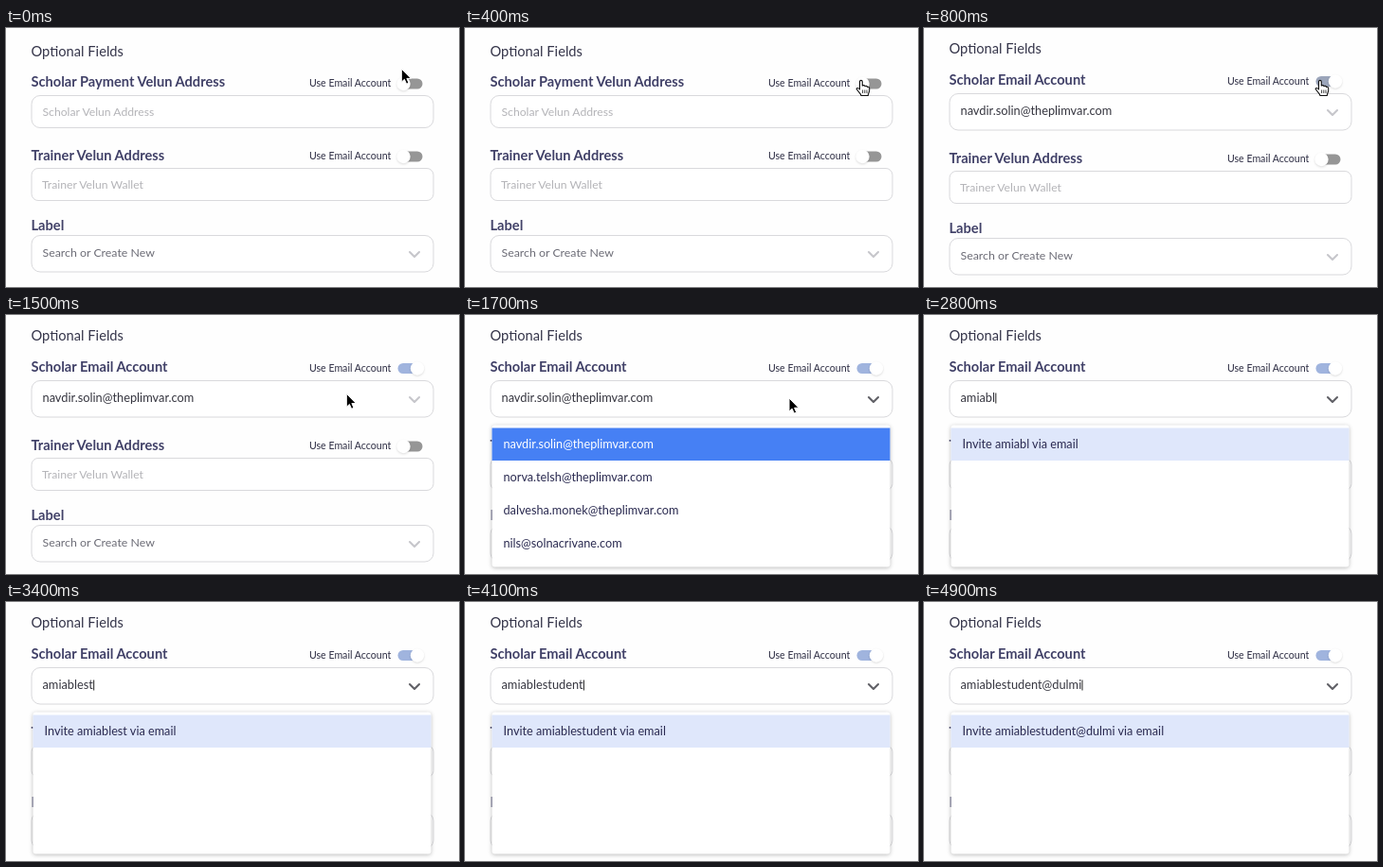
Write an HTML page that moves like this. It is 478x274 px and loops after 5000 ms.

```html
<!DOCTYPE html>
<html lang="en">
<head>
<meta charset="utf-8">
<title>Optional fields</title>
<style>
  html, body { margin: 0; width: 100%; height: 100%; overflow: hidden; background: #fefefe; }
  svg { display: block; font-family: Lato, "Open Sans", sans-serif; }
  .title { font-size: 14.7px; fill: #35354a; }
  .head { font-size: 14.65px; font-weight: 700; fill: #414168; }
  .small { font-size: 10.6px; fill: #2c2c42; }
  .hint { font-size: 12.2px; fill: #b4b4b8; }
  .pick { font-size: 12.35px; fill: #6c6c76; }
  .value { font-size: 12.8px; fill: #35353f; }
  .row { font-size: 12.7px; fill: #2a2a50; }
  .box { fill: #fff; stroke: #d9d9dc; }
  .chevron { fill: none; stroke: #c6c6cb; stroke-width: 2.1; stroke-linecap: round; stroke-linejoin: round; }
  .knob { fill: #fff; filter: drop-shadow(0 1px 1px #0002); }
  #menu > rect:first-child { fill: #fff; filter: drop-shadow(0 1px 2px #0004); }
</style>
</head>
<body>
<svg width="478" height="274" viewBox="0 0 478 274">
  <g id="upper">
    <text class="title" x="26.5" y="29.8">Optional Fields</text>
    <text class="head" id="head" x="26.5" y="62.4"></text>
    <text class="small" x="320" y="62.4">Use Email Account</text>
    <rect id="track" x="413.5" y="53.5" width="26" height="11" rx="5.5"/>
    <circle id="knob" class="knob" cy="59" r="7.2"/>
  </g>
  <rect id="field" class="box" x="27" width="424" rx="9"/>
  <text id="value" x="38.5"></text>
  <path id="caret" stroke="#222" stroke-width="1"/>
  <path id="arrowDown" class="chevron" d="M426 87l5 5 5-5"/>

  <g id="lower">
    <text class="head" x="26.5" y="139.8">Trainer Velun Address</text>
    <text class="small" x="320" y="139.4">Use Email Account</text>
    <rect x="413.5" y="130.5" width="26" height="11" rx="5.5" fill="#969696"/>
    <circle class="knob" cx="419.5" cy="136" r="7.2"/>
    <rect class="box" x="27" y="148.5" width="424" height="34" rx="7"/>
    <text class="hint" x="38" y="170">Trainer Velun Wallet</text>
    <text class="head" x="26.5" y="213.5">Label</text>
    <rect class="box" x="27" y="219.5" width="424" height="38.5" rx="9"/>
    <text class="pick" x="38.5" y="242">Search or Create New</text>
    <path class="chevron" d="M426 237l5 5 5-5"/>
  </g>

  <g id="menu">
    <rect x="28.5" y="116.5" width="420" height="150" rx="3"/>
    <rect id="mark" x="28.5" y="119.5" width="420" height="34.5"/>
    <text class="row" x="40.5" y="141"></text>
    <text class="row" x="40.5" y="176"></text>
    <text class="row" x="40.5" y="211"></text>
    <text class="row" x="40.5" y="246"></text>
  </g>

  <g id="pointer" stroke-linejoin="round">
    <path id="arrow" fill="#000" stroke="#fff" d="M0 0V14L3.1 11.1 5.3 16 7.7 15 5.6 10.2H10Z"/>
    <g id="hand" fill="#fff" stroke="#111" stroke-width="1.1">
      <path d="M-1.5 1.2C-1.5-.6 1.3-.6 1.3 1.2V5.5C2 4.8 3.8 5 4 6.2 4.8 5.5 6.3 5.8 6.5 7 7.5 6.5 8.7 7 8.7 8.3V10.5C8.7 12.5 7.3 13.5 7.3 16H0C-.2 13.8-3.5 11.5-4.8 9-5 7.8-3.3 7.5-1.5 9.5Z"/>
      <path stroke-width=".8" d="M1.6 10v3.5M3.8 10v3.5M6 10v3.5"/>
    </g>
  </g>
</svg>
<script>
const LOOP = 5000, STEP = 100, TOGGLE = 700, OPEN = 1700, TYPE = 2100;
const $ = id => document.getElementById(id);
const rows = [...document.querySelectorAll('#menu text')];
const people = [
  'navdir.solin@theplimvar.com',
  'norva.telsh@theplimvar.com',
  'dalvesha.monek@theplimvar.com',
  'nils@solnacrivane.com'
];
const typed = 'amiablestudent@dulmi';

// [start, letters shown at start, end]; one more letter each step in between
const bursts = [[2100, 1, 2100], [2400, 2, 2400], [2600, 4, 2600], [2800, 6, 2800],
  [3200, 7, 3600], [3800, 12, 4000], [4400, 15, 4900]];
// [time, x, y] of the pointer tip
const path = [[0, 417.3, 43.2], [100, 417.3, 44], [400, 418, 55.5], [1100, 418, 55.5],
  [1500, 359.3, 83.3], [1700, 342, 88]];

const clamp = x => Math.max(0, Math.min(1, x));
const mix = (a, b, p) => a + (b - a) * p;
const show = (id, on) => $(id).setAttribute('visibility', on ? 'visible' : 'hidden');
const set = (id, attrs) => {
  for (const key in attrs) $(id).setAttribute(key, attrs[key]);
};

function letters(t) {
  let n = 0;
  for (const [from, count, to] of bursts)
    if (t >= from) n = count + (Math.min(t, to) - from) / STEP;
  return n;
}

function position(t) {
  let i = 0;
  while (i < path.length - 2 && t >= path[i + 1][0]) i++;
  const [a, x, y] = path[i], [b, u, v] = path[i + 1];
  const p = clamp((t - a) / (b - a)), e = p * p * (3 - 2 * p);
  return [mix(x, u, e), mix(y, v, e)];
}

function draw(t) {
  const email = t >= TOGGLE, open = t >= OPEN, typing = t >= TYPE;
  const word = typed.slice(0, letters(t));
  const inviting = word.length > 1;

  set('upper', { transform: `translate(0 ${email ? -2.5 : 0})` });
  set('lower', { transform: `translate(0 ${email ? 3 : 0})` });
  $('head').textContent = email ? 'Scholar Email Account' : 'Scholar Payment Velun Address';
  set('field', email ? { y: 69.5, height: 38.5 } : { y: 71.5, height: 34 });

  // the knob slides faster than the track changes colour
  const slide = clamp((t - TOGGLE + 50) / 150), tint = clamp((t - TOGGLE) / 200);
  const rgb = [[150, 160], [150, 180], [150, 222]].map(([a, b]) => mix(a, b, tint));
  set('track', { fill: `rgb(${rgb})` });
  set('knob', { cx: mix(419.5, 434, slide) });

  set('value', { class: email ? 'value' : 'hint', y: email ? 91.6 : 93 });
  $('value').textContent = typing ? word : email ? people[0] : 'Scholar Velun Address';
  show('caret', typing);
  if (typing) set('caret', { d: `M${39.3 + $('value').getComputedTextLength()} 82.5v11` });
  show('arrowDown', email);
  $('arrowDown').style.stroke = open ? '#606066' : '';

  show('menu', open);
  set('mark', { fill: inviting ? '#dfe7fb' : '#4680f4' });
  const items = inviting ? [`Invite ${word} via email`] : people;
  rows.forEach((row, i) => row.textContent = items[i] || '');
  rows[0].style.fill = inviting ? '' : '#fff';

  const hand = t >= 300 && t < 1300;
  set('pointer', { transform: `translate(${position(t)})` });
  show('arrow', !typing && !hand);
  show('hand', hand);
}

const start = performance.now();
function tick() {
  const t = (performance.now() - start) % LOOP;
  draw(Math.floor(t / STEP) * STEP);
  requestAnimationFrame(tick);
}
tick();
</script>
</body>
</html>
```
